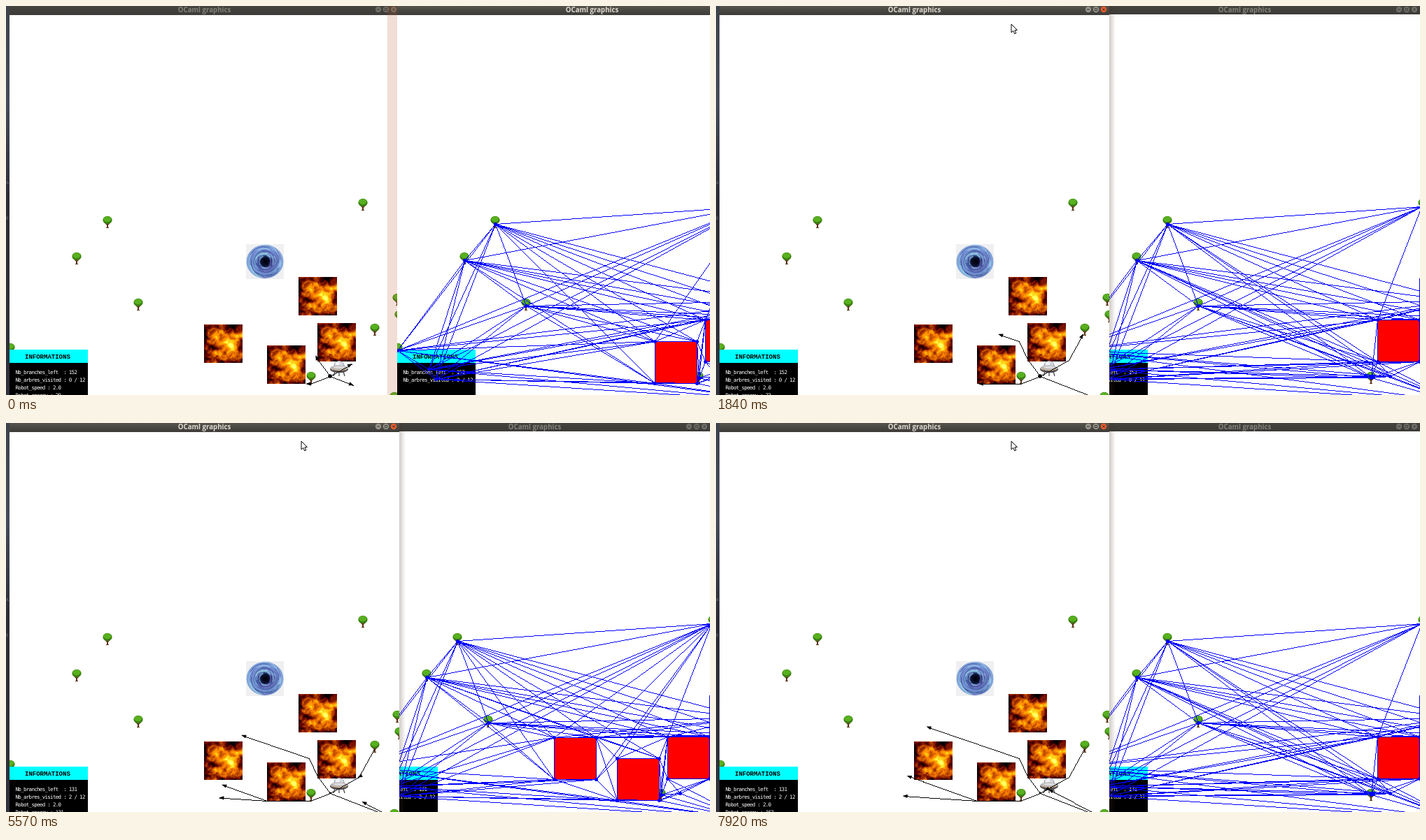
Animation, 1006 px wide and 557 px high, one loop 7990 ms. Source, as an HTML page with a canvas:

```html
<!DOCTYPE html>
<html lang="en">
<head>
<meta charset="utf-8">
<title>Robot exploration</title>
<style>
html, body { margin: 0; width: 100%; height: 100%; overflow: hidden; background: #fff; }
canvas { display: block; }
</style>
</head>
<body>
<canvas id="stage" width="1006" height="557"></canvas>
<script>
const W = 1006, H = 557, LOOP = 7990;
const SNAP = 300, RAISE = 620;   // when the right window docks, then the left one is raised
const g = document.getElementById('stage').getContext('2d');

// World coordinates are those of the left window.
const trees = [[145, 308], [101, 360], [189, 426], [510, 283], [559, 419], [562, 443],
  [527, 462], [436, 531], [6, 490], [555, 560]];
const fires = [[418, 388], [283, 456], [373, 486], [445, 454]];
const squares = [[283, 450], [373, 480], [445, 449]];
const places = [[145, 312], [101, 364], [189, 429], [508, 287], [5, 493], [50, 520], [60, 534],
  [559, 422], [561, 446], [527, 466], [436, 532], [463, 530], [555, 566]];

// Each branch leaves its first point once the spent energy reaches `from`.
const STRIDE = 1.22;
const root = [463, 530], crook = [[435, 541], [373, 541]];
const branches = [
  { from: 0, pts: [root, [445, 506], [433, 480], [296, 433]] },
  { from: 0, pts: [root, [504, 507], [526, 467]] },
  { from: 0, pts: [root, [555, 566]] },
  { from: 0, pts: [root, ...crook, [270, 504]] },
  { from: 0, pts: [root, ...crook, [260, 533.5]] },
  { from: 93, pts: [[526, 467], [504, 507], root] },
  { from: 89, pts: [[555, 566], [470, 522]] }
];
const energyKeys = [[0, 29], [1120, 55], [1840, 73], [3000, 98], [4530, 117], [6530, 144], [7920, 162], [7990, 163]];

function energyAt(t) {
  const i = energyKeys.findIndex(k => k[0] > t);
  const [t0, e0] = energyKeys[i - 1], [t1, e1] = energyKeys[i];
  return e0 + (e1 - e0) * (t - t0) / (t1 - t0);
}

function rect(x, y, w, h, fill) {
  g.fillStyle = fill;
  g.fillRect(x, y, w, h);
}

function ellipse(c, x, y, rx, ry, fill) {
  c.fillStyle = fill;
  c.beginPath();
  c.ellipse(x, y, rx, ry, 0, 0, 7);
  c.fill();
}

function stroke(c, pts, color, width = 1) {
  c.strokeStyle = color;
  c.lineWidth = width;
  c.beginPath();
  pts.forEach(p => c.lineTo(...p));
  c.stroke();
}

// One pixel wide line without smoothing, as a plain graphics library draws it.
function pixelLine(c, [x0, y0], [x1, y1]) {
  const n = Math.ceil(Math.max(Math.abs(x1 - x0), Math.abs(y1 - y0))) || 1;
  for (let i = 0; i <= n; i++)
    c.fillRect(Math.round(x0 + (x1 - x0) * i / n), Math.round(y0 + (y1 - y0) * i / n), 1, 1);
}

function write(text, x, y, font, color, align = 'left') {
  g.font = font;
  g.fillStyle = color;
  g.textAlign = align;
  g.fillText(text, x, y);
}

function sprite(w, h, paint) {
  const c = document.createElement('canvas');
  c.width = w;
  c.height = h;
  paint(c.getContext('2d'));
  return c;
}

function random(seed) {
  return () => (seed = seed * 16807 % 2147483647) / 2147483647;
}

function hash(x, y) {
  const s = Math.sin(x * 127.1 + y * 311.7) * 43758.5453;
  return s - Math.floor(s);
}

function noise(x, y) {
  const i = Math.floor(x), j = Math.floor(y);
  const u = (x - i) ** 2 * (3 - 2 * (x - i)), v = (y - j) ** 2 * (3 - 2 * (y - j));
  const mix = (a, b, f) => a + (b - a) * f;
  return mix(mix(hash(i, j), hash(i + 1, j), u), mix(hash(i, j + 1), hash(i + 1, j + 1), u), v);
}

const fire = sprite(55, 55, c => {
  for (let x = 0; x < 55; x++) for (let y = 0; y < 55; y++) {
    const bend = 7 * noise(x / 8 + 30, y / 8);
    let heat = 0.1 - Math.hypot(x - 24, y - 27) / 190;
    for (let s = 1; s < 16; s *= 2) heat += noise((x + bend) * s / 14, (y - bend) * s / 14 + 9) * 0.62 / s ** 0.8;
    heat -= 0.12;
    c.fillStyle = `rgb(${560 * heat - 120},${480 * heat - 190},${420 * heat - 320})`;
    c.fillRect(x, y, 1, 1);
  }
});

const portal = sprite(54, 50, c => {
  const r = random(19);
  c.fillStyle = '#f0f0f2';
  c.fillRect(0, 0, 54, 50);
  const glow = c.createRadialGradient(28, 25, 2, 27, 25, 27);
  [[0, '#020410'], [0.16, '#0a1030'], [0.36, '#4a5aa8'], [0.7, '#7c9cdc'], [1, '#86a8d6']]
    .forEach(s => glow.addColorStop(...s));
  ellipse(c, 27, 25, 26.5, 24, glow);
  const tones = ['#b4e6f4', '#4a50a4', '#8ccfea', '#6660b4', '#3a6096'];
  for (let i = 0; i < 80; i++) {
    const size = 8 + r() * 17, start = r() * 7;
    c.strokeStyle = tones[i % 5];
    c.lineWidth = 0.8;
    c.beginPath();
    c.ellipse(27, 25, size, size * 0.92, start, 0, 0.5 + r() * 1.4);
    c.stroke();
  }
});

// Sight lines between all places and corners of the known squares.
function sightGraph(known) {
  const corners = known.flatMap(([x, y]) => [[x, y], [x + 60, y], [x + 60, y + 60], [x, y + 60]]);
  const nodes = [...places, ...corners];
  const blocked = (a, b) => {
    for (let i = 1; i < 200; i++) {
      const x = a[0] + (b[0] - a[0]) * i / 200, y = a[1] + (b[1] - a[1]) * i / 200;
      if (known.some(s => x > s[0] + 1 && x < s[0] + 59 && y > s[1] + 1 && y < s[1] + 59)) return true;
    }
    return false;
  };
  const lines = sprite(570, H, c => {
    c.fillStyle = '#00f';
    nodes.forEach((a, i) => nodes.slice(i + 1).forEach(b => blocked(a, b) || pixelLine(c, a, b)));
    pixelLine(c, [505, 390], [505, 450]);
    nodes.forEach(([x, y]) => ellipse(c, x + 0.5, y + 0.5, 2.5, 2.5, '#00f'));
  });
  return { known, lines };
}
const graphs = [squares.slice(2), squares.slice(1), squares].map(sightGraph);

function graphAt(t) {
  if (t < SNAP) return graphs[1];
  const beat = Math.floor((t + 50) / 70) % 7;
  return graphs[beat === 3 ? 2 : beat === 5 ? 1 : 0];
}

function tree([x, y]) {
  rect(x - 1, y + 2, 2, 8, '#5b3413');
  rect(x - 2, y + 9, 4, 1, '#5b3413');
  stroke(g, [[x - 4, y + 2], [x, y + 6], [x + 4, y + 2]], '#5b3413', 1.2);
  ellipse(g, x, y - 1.6, 6.6, 5.6, '#38800f');
  ellipse(g, x - 0.2, y - 2.8, 5.4, 4, '#58b01f');
}

function saucer(x, y) {
  for (const dx of [-8, 0, 8])
    stroke(g, [[x + dx * 0.7, y + 3], [x + dx, y + 11]], '#4b4a50', 1.3);
  ellipse(g, x, y - 4.5, 7.5, 6.5, '#8b909a');
  ellipse(g, x, y - 5, 6.5, 5.5, '#d3d8e0');
  ellipse(g, x - 2, y - 7, 3, 2.6, '#f3f5f8');
  ellipse(g, x, y + 1, 13, 5.2, '#514f55');
  ellipse(g, x, y - 0.6, 12.5, 3.8, '#b9b7ba');
  ellipse(g, x, y - 1.8, 8, 1.8, '#dddbdd');
  for (let i = -2; i < 3; i++) ellipse(g, x + i * 4.5, y + 3 - Math.abs(i) * 0.7, 1.1, 1, '#e0a35c');
}

function panel(x, rows) {
  rect(x, 511, 112, 46, '#000');
  rect(x, 492, 112, 19, '#0ff');
  write('INFORMATIONS', x + 22, 505, 'bold 9px "Liberation Mono", monospace', '#000');
  g.letterSpacing = '-0.7px';
  rows.forEach((row, i) =>
    write(row, x + 8.5, 526.6 + i * 11, '7.5px "DejaVu Sans Mono", monospace', '#fff'));
  g.letterSpacing = '0px';
}

function titleBar(x, w, active, h) {
  const shade = g.createLinearGradient(0, 0, 0, h);
  shade.addColorStop(0, active ? '#56544d' : '#45443f');
  shade.addColorStop(1, '#3c3b37');
  rect(x, 0, w, h, shade);
  write('OCaml graphics', x + w / 2, 8.7, 'bold 9.7px "Open Sans", sans-serif',
    active ? '#dfdbd2' : '#85827b', 'center');
  [-30, -19, -8].forEach((dx, i) => {
    const bx = x + w + dx, ink = active ? '#3c3b37' : '#42413c';
    ellipse(g, bx, 5, 4.2, 4.2, !active ? '#6f6d67' : i === 2 ? '#ee5b2a' : '#96938a');
    if (i === 0) stroke(g, [[bx - 2, 5], [bx + 2, 5]], ink);
    if (i === 1) {
      g.strokeStyle = ink;
      g.lineWidth = 0.9;
      g.strokeRect(bx - 1.6, 3.4, 3.2, 3.2);
    }
    if (i === 2) {
      stroke(g, [[bx - 1.6, 3.4], [bx + 1.6, 6.6]], ink);
      stroke(g, [[bx + 1.6, 3.4], [bx - 1.6, 6.6]], ink);
    }
  });
}

function clipped(x, w, paint) {
  g.save();
  g.beginPath();
  g.rect(x, 0, w, H);
  g.clip();
  paint();
  g.restore();
}

function drawBranch({ from, pts }, energy) {
  let left = (energy - from) * STRIDE;
  if (left <= 0) return;
  let tip = pts[0], angle = 0;
  g.fillStyle = '#000';
  for (let i = 1; i < pts.length && left > 0; i++) {
    const [x, y] = pts[i - 1], dx = pts[i][0] - x, dy = pts[i][1] - y;
    const len = Math.hypot(dx, dy), f = Math.min(1, left / len);
    angle = Math.atan2(dy, dx);
    tip = [x + dx * f, y + dy * f];
    pixelLine(g, [x, y], tip);
    left -= len;
  }
  if (left > 1) return;
  g.save();
  g.translate(...tip);
  g.rotate(angle);
  g.beginPath();
  [[1, 0], [-6, -2.6], [-6, 2.6]].forEach(p => g.lineTo(...p));
  g.fill();
  g.restore();
}

function leftWindow(active, energy, rows) {
  clipped(5, 557, () => {
    rect(5, 13, 557, H, '#fff');
    trees.forEach(tree);
    g.drawImage(portal, 343, 341);
    fires.forEach(p => g.drawImage(fire, ...p));
    saucer(476, 519);
    branches.forEach(b => drawBranch(b, energy));
    const size = energy < 88 ? 2.8 : 1.4;
    ellipse(g, ...root, size, size, '#000');
    panel(5, rows);
    titleBar(5, 557, active, 13);
  });
}

function rightWindow(x, w, active, graph, rows) {
  clipped(x, w, () => {
    rect(x, 12, w, H, '#fff');
    g.save();
    g.translate(x - 5, 0);
    trees.forEach(tree);
    panel(5, rows.slice(0, 2));
    graph.known.forEach(([sx, sy]) => rect(sx + 1, sy + 1, 59, 59, '#f00'));
    g.drawImage(graph.lines, 0, 0);
    g.restore();
    titleBar(x, w, active, active ? 13 : 12);
  });
}

function pointer(x, y) {
  g.beginPath();
  [[0, 0], [0, 12], [2.8, 9.5], [4.7, 13.8], [6.8, 12.9], [4.9, 8.8], [8.4, 8.5]]
    .forEach(p => g.lineTo(x + p[0], y + p[1]));
  g.closePath();
  g.fillStyle = '#fff';
  g.fill();
  g.strokeStyle = '#000';
  g.lineWidth = 1;
  g.stroke();
}

function draw(t) {
  const energy = energyAt(t), graph = graphAt(t);
  const visited = energy < 79 ? 0 : energy < 87 ? 1 : 2;
  const rows = [`Nb_branches_left  : ${[152, 141, 131][visited]}`, `Nb_arbres_visited : ${visited} / 12`,
    'Robot_speed : 2.0', `Robot_energy : ${Math.floor(energy + 0.01)}`];

  const desk = g.createLinearGradient(0, 0, 0, H);
  [[0, '#3d434c'], [0.25, '#454b5c'], [0.5, '#2b2c36'], [1, '#30323d']].forEach(s => desk.addColorStop(...s));
  rect(0, 0, W, H, desk);
  write('A', 0, 255, '6px "DejaVu Sans", sans-serif', '#6c6e76');
  write('E', 0, 306, '6px "DejaVu Sans", sans-serif', '#6c6e76');

  if (t < SNAP) {
    leftWindow(false, energy, rows);
    const edge = 545 - 42 * Math.min(1, t / 200);   // docking preview widens
    rect(edge, 0, 559 - edge, H, 'rgba(190,90,50,.2)');
    rightWindow(559, 557, true, graph, rows);
  } else if (t < RAISE) {
    leftWindow(false, energy, rows);
    rightWindow(505, 501, true, graph, rows);
    const f = (t - SNAP) / (RAISE - SNAP);
    pointer(990 - 568 * f, 6 + 20 * f);
  } else {
    rightWindow(505, 501, false, graph, rows);
    const shadow = g.createLinearGradient(562, 0, 571, 0);
    shadow.addColorStop(0, 'rgba(70,45,30,.25)');
    shadow.addColorStop(1, 'rgba(70,45,30,0)');
    rect(562, 0, 9, H, shadow);
    leftWindow(true, energy, rows);
    pointer(422, 26);
  }
}

const began = performance.now();
function tick() {
  draw((performance.now() - began) % LOOP);
  requestAnimationFrame(tick);
}
tick();
</script>
</body>
</html>
```
